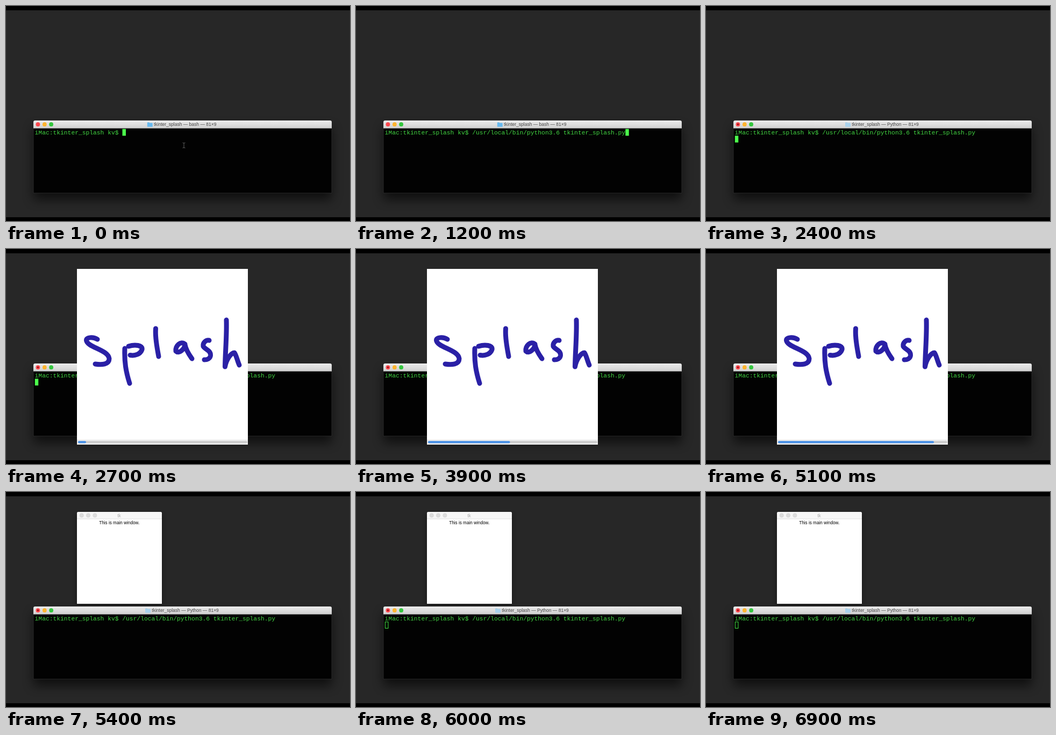
Animation of 640 by 400 pixels, one loop 7200 ms. Source, as an HTML page:

```html
<!DOCTYPE html>
<html lang="en">
<head>
<meta charset="utf-8">
<title>Splash screen demo</title>
<style>
  html, body { margin: 0; width: 100%; height: 100%; overflow: hidden; background: #000; }
  svg { display: block; width: 640px; height: 400px; }
  text { white-space: pre; }
  .ui { font-family: "Liberation Sans", Arial, sans-serif; text-anchor: middle; }
  .mono { font: 11.3px "Liberation Mono", "DejaVu Sans Mono", monospace; fill: #42d642; }
  .ink { fill: none; stroke: #2a20a6; stroke-width: 9; stroke-linecap: round; stroke-linejoin: round; }
</style>
</head>
<body>
<svg viewBox="0 0 640 400">
  <defs>
    <linearGradient id="titleFill" x2="0" y2="1">
      <stop stop-color="#ebebeb"/>
      <stop offset="1" stop-color="#d0d0d0"/>
    </linearGradient>
    <filter id="wideBlur" x="-20%" y="-50%" width="140%" height="200%">
      <feGaussianBlur stdDeviation="10"/>
    </filter>
    <filter id="softBlur" x="-20%" y="-20%" width="140%" height="140%">
      <feGaussianBlur stdDeviation="5"/>
    </filter>
    <clipPath id="desktop"><rect y="8" width="640" height="385"/></clipPath>
  </defs>

  <g clip-path="url(#desktop)">
    <rect width="640" height="400" fill="#272727"/>

    <g id="mainWindow">
      <rect x="132" y="42" width="158" height="168" opacity=".4" filter="url(#softBlur)"/>
      <path d="M132 208V40a3 3 0 0 1 3-3H287a3 3 0 0 1 3 3V208Z" fill="#fff"/>
      <path d="M132 50V40a3 3 0 0 1 3-3H287a3 3 0 0 1 3 3V50Z" fill="#f6f6f6"/>
      <path d="M132 50H290" stroke="#d8d8d8" stroke-width=".8"/>
      <g fill="#dcdcdc" stroke="#cfcfcf" stroke-width=".5">
        <circle cx="140.7" cy="43.5" r="3.7"/>
        <circle cx="153" cy="43.5" r="3.7"/>
        <circle cx="165.4" cy="43.5" r="3.7"/>
      </g>
      <text class="ui" x="210.5" y="46.5" font-size="8.5" fill="#aaa">tk</text>
      <text class="ui" x="210.7" y="60" font-size="8.2">This is main window.</text>
    </g>

    <rect x="51" y="226" width="555" height="134" opacity=".62" filter="url(#wideBlur)"/>
    <path d="M51 348V216a3 3 0 0 1 3-3H603a3 3 0 0 1 3 3V348Z" fill="#020202" stroke="#3a3a3a" stroke-width=".6"/>
    <path d="M51 227.5V216a3 3 0 0 1 3-3H603a3 3 0 0 1 3 3V227.5Z" fill="url(#titleFill)"/>
    <path d="M51 227.3H606" stroke="#aaa" stroke-width=".6"/>
    <circle cx="59.4" cy="220.2" r="3.9" fill="#fc484e"/>
    <circle id="busyDot" cx="59.4" cy="220.2" r="1.4" fill="#7d0a0e"/>
    <circle cx="71.8" cy="220.2" r="3.9" fill="#fdb42e"/>
    <circle cx="84.1" cy="220.2" r="3.9" fill="#34c63e"/>
    <path id="folder" d="M0 217.2a.7.7 0 0 1 .7-.7H3.6L4.6 217.5H9.3a.7.7 0 0 1 .7.7V224a.7.7 0 0 1-.7.7H.7A.7.7 0 0 1 0 224Z"/>
    <text id="title" class="ui" y="223.2" font-size="8.5" fill="#454545"></text>
    <text id="line" class="mono" x="53.6" y="239"></text>
    <rect id="cursor" stroke="#4cff4c"/>
    <path id="pointer" d="M328.5 254.5Q331 254.5 331 256Q331 254.5 333.5 254.5M331 256V262.5M328.5 264Q331 264 331 262.5Q331 264 333.5 264" fill="none" stroke="#555" stroke-width="1.1"/>

    <g id="splash">
      <rect x="132" y="37" width="318" height="327" fill="#fff"/>
      <rect x="132" y="354.5" width="318" height="9.5" fill="#ececec"/>
      <rect x="134" y="357.3" width="315" height="4" rx="2" fill="#cbcbcb"/>
      <rect id="progress" x="134" y="357.3" height="4" rx="2" fill="#4790e6"/>
      <g class="ink">
        <path d="M170 168C162 163 149 164 149.500 170C151 183 190 187 192 204C192 215 178 216 166 214"/>
        <path d="M221 185C220 210 223 228 230 250M228 181C240 177 255 179 253 187C250 196 240 199 231 197.500"/>
        <path d="M278.500 148C277 165 281 183 284 200"/>
        <path d="M333 177C325 170 315 180 316 190C322 196 332 186 333 178C335 189 341 197 346 204"/>
        <path d="M378 170C372 169 366 174 367 181C370 187 381 188 380.500 198C380 204 374 206 369 206"/>
        <path d="M410 132C411 160 408 190 407.500 219C410 205 419 193 425 193C429 199 430 207 434 216"/>
      </g>
    </g>
  </g>
</svg>
<script>
const LOOP = 7200, STEP = 300, CHAR = 6.78;
const PROMPT = "iMac:tkinter_splash kv$ ";
const COMMAND = "/usr/local/bin/python3.6 tkinter_splash.py";
const el = id => document.getElementById(id);

function set(id, attrs) {
  for (const [name, value] of Object.entries(attrs)) el(id).setAttribute(name, value);
}
const show = (id, visible) => set(id, { visibility: visible ? "visible" : "hidden" });
const within = (t, from, to) => t >= from && t < to;

function drawCursor(t, column, running) {
  const hollow = t >= 6000;
  const blinkedOff = within(t, 900, 1200) || within(t, 3600, 4500) || within(t, 5100, 6000);
  show("cursor", !blinkedOff);
  set("cursor", {
    x: 53.8 + column * CHAR + (hollow ? .5 : 0),
    y: (running ? 241.3 : 228.8) + (hollow ? .4 : 0),
    width: hollow ? 5.6 : 6.4,
    height: hollow ? 11.8 : 12.6,
    fill: hollow ? "none" : "#4cff4c",
    "stroke-width": hollow ? .9 : 0
  });
}

function render(time) {
  const t = Math.floor((time % LOOP) / STEP) * STEP;
  const entered = t >= 300, running = t >= 1800;
  const text = PROMPT + (entered ? COMMAND : "");

  el("line").textContent = text;
  el("title").textContent = `tkinter_splash — ${running ? "Python" : "bash"} — 81×9`;
  set("title", { x: running ? 333.6 : 333.2 });
  set("folder", {
    transform: `translate(${running ? 259 : 262.8} 0)`,
    fill: running ? "#a9d2ec" : "#68b9ee"
  });
  show("busyDot", running);
  show("pointer", !entered);
  drawCursor(t, running ? 0 : text.length, running);

  show("splash", within(t, 2700, 5400));
  set("progress", { width: Math.max(0, 15 + (t - 2700) * .1146) });
  show("mainWindow", t >= 5400);
}

const start = performance.now();
function tick(now) {
  render(Math.max(0, now - start));
  requestAnimationFrame(tick);
}
render(0);
requestAnimationFrame(tick);
</script>
</body>
</html>
```
